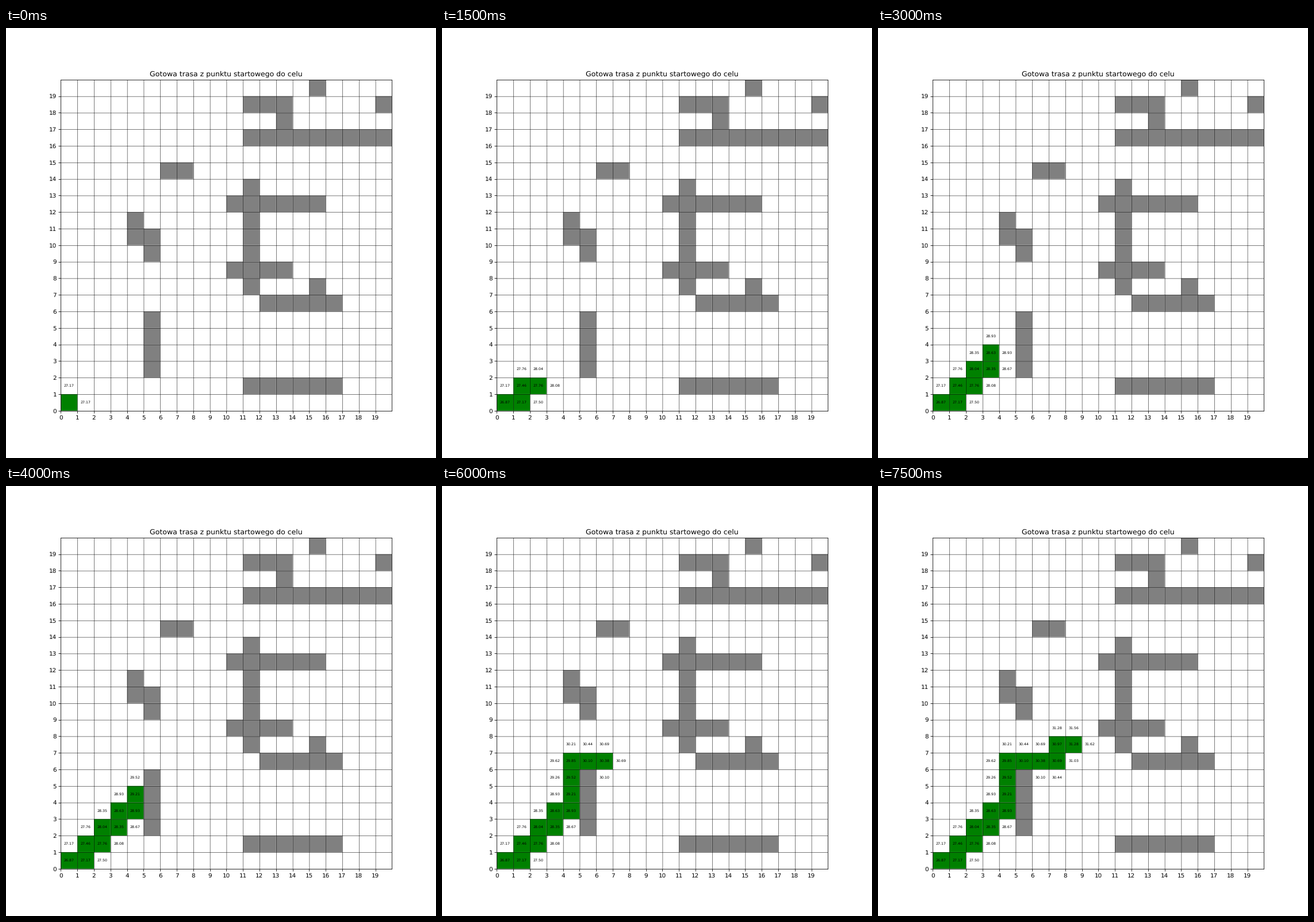
These frames come from a looping animation (748 px wide and 748 px high, 8000 ms). A matplotlib script:

```python
import matplotlib.pyplot as plt
from matplotlib.animation import FuncAnimation
from matplotlib.patches import Rectangle

SIZE = 20
GOAL = (19, 19)
FRAMES = 16
NUDGE = 0.02  # grid lines sit a touch right of and below the cell edges
STEPS = {"R": (1, 0), "L": (-1, 0), "U": (0, 1), "D": (0, -1)}

plt.rcParams["text.hinting"] = "none"


def walk(x, y, moves=""):
    """Cells passed when following the moves from (x, y)."""
    cells = [(x, y)]
    for move in moves:
        dx, dy = STEPS[move]
        x, y = x + dx, y + dy
        cells.append((x, y))
    return cells


walls = {
    *walk(15, 19), *walk(19, 18),
    *walk(11, 18, "RRDDLL" + "R" * 8),
    *walk(6, 14, "R"),
    *walk(11, 13, "D" * 6), *walk(10, 12, "R" * 5), *walk(10, 8, "RRR"),
    *walk(12, 6, "RRRUDR"),
    *walk(4, 11, "DRD"), *walk(5, 5, "DDD"),
    *walk(11, 1, "R" * 5),
}


def neighbours(cell):
    for dx, dy in STEPS.values():
        near = cell[0] + dx, cell[1] + dy
        if min(near) >= 0 and max(near) < SIZE and near not in walls:
            yield near


def distance(cell):
    return sum((g - c) ** 2 for g, c in zip(GOAL, cell)) ** 0.5


def add_cell(cell, color):
    return ax.add_patch(Rectangle(cell, 1, 1, color=color, lw=0, snap=False))


fig, ax = plt.subplots(figsize=(10, 10), dpi=74.8)
ax.set(xlim=(0, SIZE), ylim=(0, SIZE), aspect="equal",
       xticks=range(SIZE), yticks=range(SIZE))
ax.set_title("Gotowa trasa z punktu startowego do celu")

for k in range(1, SIZE):
    style = dict(color="black", lw=0.5, zorder=1.5, snap=False)
    ax.axvline(k + NUDGE, **style)
    ax.axhline(k - NUDGE, **style)

for cell in walls:
    add_cell(cell, "gray")

# Always step to the free cell nearest the goal
path = [(0, 0)]
while len(path) < FRAMES:
    path.append(min(neighbours(path[-1]), key=distance))
tiles = [add_cell(cell, "green") for cell in path]

# Each cost label appears when a cell next to it is first reached
labels = {}
for step, here in enumerate(path):
    for cell in neighbours(here):
        if cell not in labels:
            x, y = cell
            text = ax.text(x + 0.5, y + 0.5, f"{x + y + distance(cell):.2f}",
                           fontsize=6, ha="center", va="center")
            labels[cell] = (step, text)


def update(step):
    for i, tile in enumerate(tiles):
        tile.set_visible(i <= step)
    for first, text in labels.values():
        text.set_visible(first <= step)
    return [*tiles, *(text for _, text in labels.values())]


anim = FuncAnimation(fig, update, frames=FRAMES, interval=500,
                     repeat=True, repeat_delay=0)
plt.show()
```
